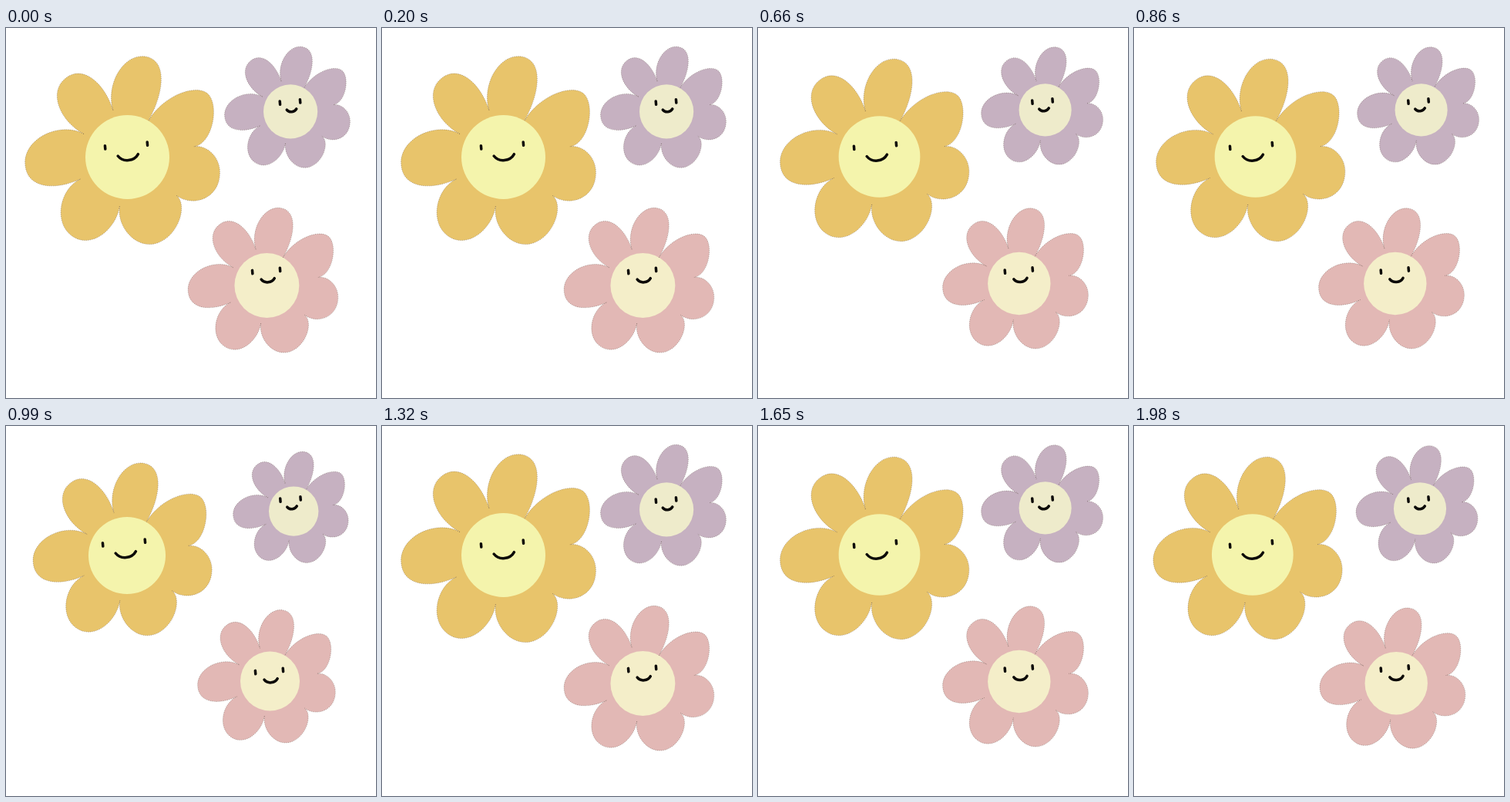
An HTML page with a canvas for the animation above (2310 ms loop, 480 px wide and 480 px high).

```html
<!DOCTYPE html>
<html lang="en">
<head>
<meta charset="utf-8">
<title>Smiling flowers</title>
<style>
  html, body { margin: 0; width: 100%; height: 100%; overflow: hidden; background: #fff; }
  canvas { display: block; }
</style>
</head>
<body>
<canvas id="stage" width="480" height="480"></canvas>
<script>
const ctx = document.getElementById('stage').getContext('2d');
const STEP = 330;
const ORDER = [0, 1, 2, 3, 0, 2, 1];    // pose shown in each step
const SHRINK = [1, .97, .97, .918];     // bloom size in each pose
const HUB_RADIUS = 54.5;
const TILT = -5 * Math.PI / 180;

// Clockwise from the upper left: the notch before the petal, then its tip,
// both as degrees and radius, and how blunt the tip is.
const PETALS = [
  { notch: [208, 64],   tip: [232, 130],   blunt: 30 },
  { notch: [253, 63],   tip: [280.5, 132.5], blunt: 29 },
  { notch: [300, 53.5], tip: [323, 133],   blunt: 21 },
  { notch: [351, 87.5], tip: [14.5, 122.5], blunt: 28 },
  { notch: [38, 80.5],  tip: [70.5, 118],  blunt: 29 },
  { notch: [99, 64],    tip: [125, 125],   blunt: 30 },
  { notch: [155, 67],   tip: [176, 133],   blunt: 33 }
];

// spots: bloom centre in each pose; looks: point between the eyes
// (the two middle poses share one)
const flowers = [
  {
    petal: '#e8c46b', hub: '#f4f4ac', size: 1, eyeGap: 55,
    spots: [[157.5, 167.5], [153.8, 167], [157.5, 167], [157, 168]],
    looks: [[156, 152.5], [152, 153], [153, 151.5]]
  },
  {
    petal: '#e2b8b5', hub: '#f4eec9', size: .77, eyeGap: 36,
    spots: [[338.4, 334], [340.2, 333.7], [338.8, 331.5], [342.5, 331]],
    looks: [[337.6, 315], [338.3, 314.6], [341.5, 318]]
  },
  {
    petal: '#c6b1c1', hub: '#eeebcb', size: .644, eyeGap: 26.3,
    spots: [[369.1, 108.4], [371, 107.3], [372.6, 106.4], [373.2, 110.6]],
    looks: [[368.5, 96], [369, 95], [369, 95]]
  }
];

function polar([degrees, radius]) {
  const a = degrees * Math.PI / 180;
  return [radius * Math.cos(a), radius * Math.sin(a)];
}

// Each side leaves its notch outwards and meets the tip square to its axis.
function makeBloom() {
  const path = new Path2D();
  path.moveTo(...polar(PETALS[0].notch));
  PETALS.forEach(({ notch, tip, blunt }, i) => {
    const next = PETALS[(i + 1) % PETALS.length].notch;
    const rise = ([angle, radius]) => polar([angle, radius + (tip[1] - radius) * .52]);
    const [x, y] = polar(tip);
    const [dx, dy] = polar([tip[0] + 90, blunt]);
    path.bezierCurveTo(...rise(notch), x - dx, y - dy, x, y);
    path.bezierCurveTo(x + dx, y + dy, ...rise(next), ...polar(next));
  });
  path.closePath();
  return path;
}

const bloom = makeBloom();

function drawBloom({ petal, hub, size, spots }, pose) {
  const scale = size * SHRINK[pose];
  ctx.save();
  ctx.translate(...spots[pose]);
  ctx.scale(scale, scale);
  ctx.fillStyle = petal;
  ctx.fill(bloom);
  // Thin, broken rim
  ctx.strokeStyle = 'rgba(70, 50, 40, .5)';
  ctx.lineWidth = .8 / scale;
  ctx.setLineDash([1 / scale, 1.5 / scale]);
  ctx.stroke(bloom);
  ctx.fillStyle = hub;
  ctx.beginPath();
  ctx.arc(0, 0, HUB_RADIUS, 0, Math.PI * 2);
  ctx.fill();
  ctx.restore();
}

function drawFace({ eyeGap, looks }, pose) {
  const mouthY = 7 + eyeGap * .1;
  const half = eyeGap * .24;
  ctx.save();
  ctx.translate(...looks[Math.ceil(pose / 2)]);
  ctx.rotate(TILT);
  ctx.strokeStyle = '#0c0a08';
  ctx.lineCap = 'round';
  ctx.lineWidth = 3.5;
  ctx.beginPath();
  for (const x of [-eyeGap / 2, eyeGap / 2]) {
    ctx.moveTo(x, -2.2);
    ctx.lineTo(x, 2.2);
  }
  ctx.translate(1.2, mouthY);
  ctx.moveTo(-half, 0);
  ctx.bezierCurveTo(-half * .55, half * .68, half * .55, half * .68, half, 0);
  ctx.stroke();
  ctx.restore();
}

function frame() {
  const pose = ORDER[Math.floor(performance.now() / STEP) % ORDER.length];
  ctx.clearRect(0, 0, 480, 480);
  for (const flower of flowers) {
    drawBloom(flower, pose);
    drawFace(flower, pose);
  }
  requestAnimationFrame(frame);
}
frame();
</script>
</body>
</html>
```
